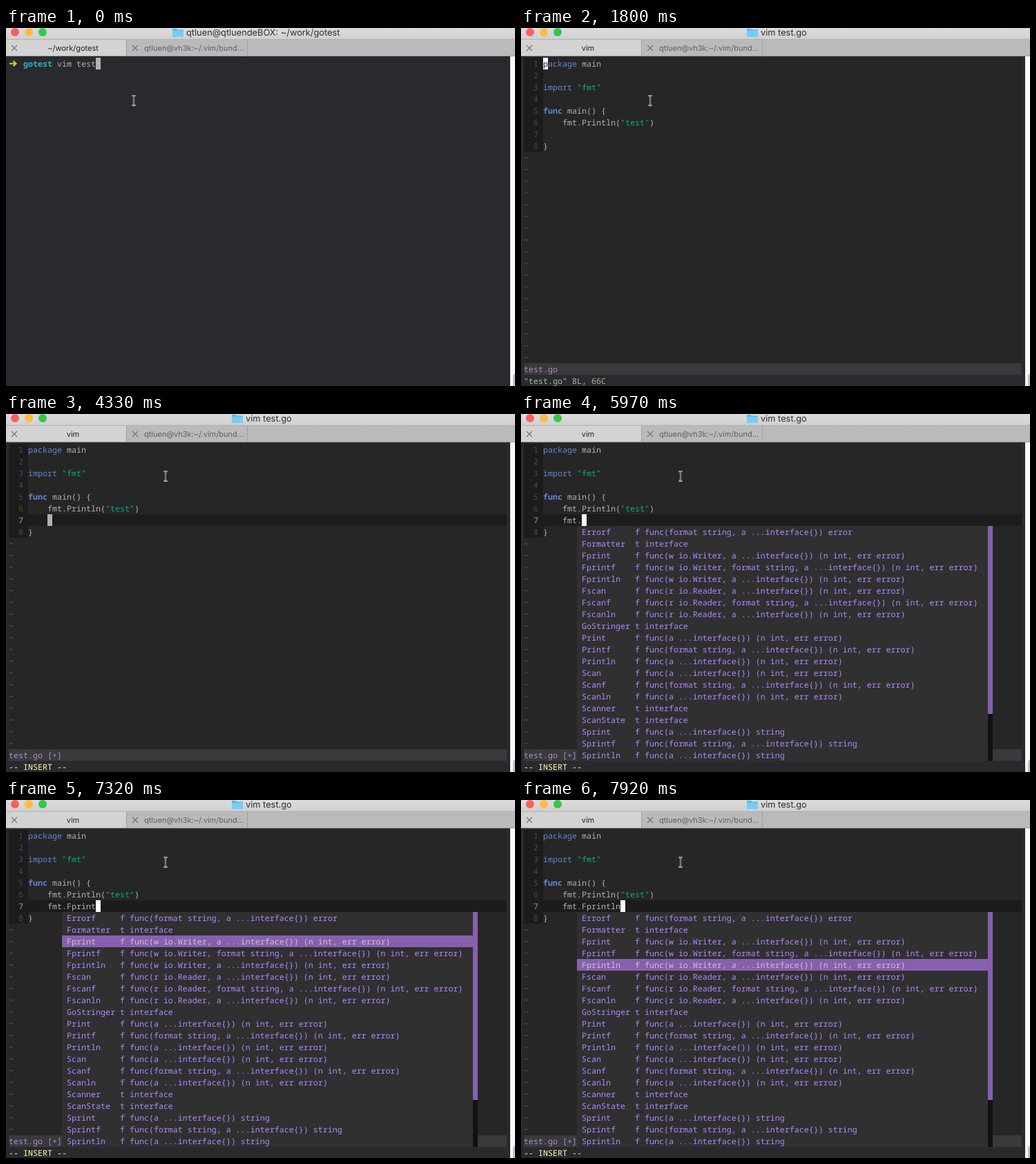
An HTML page that plays this animation: 737 by 518 pixels, repeating every 8000 ms.

```html
<!DOCTYPE html>
<html lang="en">
<head>
<meta charset="utf-8">
<title>Go completion in vim</title>
<style>
  html, body { margin: 0; width: 100%; height: 100%; overflow: hidden; background: #292a2d; }
  svg { display: block; width: 737px; height: 518px; }
  text { white-space: pre; text-rendering: geometricPrecision; }
  .mono { font-family: "Noto Sans Mono", "DejaVu Sans Mono", monospace; font-size: 11.667px; }
  .ui { font-family: Inter, Roboto, sans-serif; font-size: 11px; }
  .title { font-size: 12.8px; }
</style>
</head>
<body>
<svg id="stage" viewBox="0 0 737 518"></svg>
<script>
const LOOP = 8000, CELL = 7, ROW = 17, LEFT = 4, TOP = 43;
const C = {
  term: '#292a2d', editor: '#262626', dark: '#1c1c1c', text: '#b2b2b2', dim: '#4a4a4a',
  tilde: '#606060', keyword: '#5f87d7', string: '#00af87', purple: '#875faf', status: '#3a3a3a',
  label: '#af87d7', menu: '#303030', item: '#af87ff', mode: '#ffffaf'
};

// Each step overrides part of the state from its time onward.
const STEPS = [
  [0, { view: 'shell', command: 'vim test', mouse: [185, 105], cursor: '#b5b5b5', sel: -1 }],
  [600, { command: 'vim test.' }],
  [900, { command: 'vim test.g' }],
  [1050, { command: 'vim test.go' }],
  [1200, { view: 'launch', mouse: [184, 105] }],
  [1350, { view: 'blank', mouse: [185, 105] }],
  [1800, { view: 'vim', mouse: [187, 105], cursor: '#ffffff', row: 0, col: 0, typed: '' }],
  [2400, { row: 1 }],
  [2540, { row: 3 }],
  [2690, { row: 4 }],
  [2840, { row: 5, col: 3 }],
  [2990, { row: 6, col: 0 }],
  [3590, { insert: true }],
  [3890, { joined: true, modified: true, row: 5, col: 23, mouse: [231, 90], cursor: '#b0b0b0' }],
  [4330, { joined: false, row: 6, col: 4 }],
  [5530, { typed: 'fm', menu: 'word' }],
  [5680, { typed: 'fmt' }],
  [5820, { typed: 'fmt.', menu: '' }],
  [5970, { menu: 'members', cursor: '#ffffff' }],
  [7020, { sel: 0 }],
  [7170, { sel: 1 }],
  [7320, { sel: 2 }],
  [7470, { sel: 3 }],
  [7620, { sel: 5 }],
  [7920, { sel: 4 }]
];

const MEMBERS = ('Errorf Formatter Fprint Fprintf Fprintln Fscan Fscanf Fscanln GoStringer Print Printf ' +
  'Println Scan Scanf Scanln Scanner ScanState Sprint Sprintf Sprintln').split(' ');

function describe(name) {
  const head = name.padEnd(11);
  if (/er$|State$/.test(name)) return head + 't interface';
  const stream = /^Fp/.test(name) ? 'w io.Writer, ' : /^Fs/.test(name) ? 'r io.Reader, ' : '';
  const format = name.endsWith('f') ? 'format string, ' : '';
  const result = name === 'Errorf' ? 'error' : /^Sp/.test(name) ? 'string' : '(n int, err error)';
  return `${head}f func(${stream}${format}a ...interface{}) ${result}`;
}

const colX = col => LEFT + CELL * col;
const rowY = row => TOP + ROW * row;
const rect = (x, y, w, h, fill, extra = '') =>
  `<rect x="${x}" y="${y}" width="${w}" height="${h}" fill="${fill}" ${extra}/>`;
const path = (d, stroke, width) =>
  `<path d="${d}" fill="none" stroke="${stroke}" stroke-width="${width}"/>`;
const ui = (x, y, str, fill, extra = '') => `<text class="ui" x="${x}" y="${y}" fill="${fill}" ${extra}>${str}</text>`;

// Spans are [text, colour, bold?] runs set one after another.
function mono(col, row, ...spans) {
  const runs = spans.map(([str, fill, bold]) =>
    `<tspan fill="${fill}"${bold ? ' font-weight="600"' : ''}>${str}</tspan>`).join('');
  return `<text class="mono" x="${colX(col)}" y="${rowY(row) + 13}">${runs}</text>`;
}

function block(col, row, fill, char = '') {
  return rect(colX(col), rowY(row), CELL, ROW, fill) + (char.trim() ? mono(col, row, [char, C.editor]) : '');
}

function closeMark(x) {
  return path(`M${x - 4} 25l8 8m0 -8l-8 8`, '#737373', 1.1);
}

function windowFrame(inShell) {
  const folderX = inShell ? 241 : 327;
  const title = inShell ? 'qtluen@qtluendeBOX: ~/work/gotest' : 'vim test.go';
  const lights = ['#fc605c', '#fdbc40', '#34c84a'].map((fill, i) =>
    `<circle cx="${13 + 20 * i}" cy="6" r="6" fill="${fill}"/>`).join('');
  return `<defs><linearGradient id="bar" x2="0" y2="1"><stop stop-color="#dcdcdc"/><stop offset="1" stop-color="#d0d0d0"/></linearGradient></defs>` +
    rect(0, 0, 737, 17, 'url(#bar)') + rect(0, 16, 737, 1, '#b0b0b0') +
    rect(0, 17, 174, 23, '#d3d3d3') + rect(174, 17, 563, 23, '#bababa') +
    rect(174, 17, 1, 23, '#a0a0a0') + rect(349, 17, 1, 23, '#a0a0a0') + rect(0, 40, 737, 1, '#9c9c9c') +
    lights +
    `<path d="M${folderX} 1h6l1.5 1.5h8.5v10h-16z" fill="#5bb9e8"/>` + rect(folderX, 4, 16, 9, '#74cdf7', 'rx="1"') +
    ui(folderX + 20, 11, title, '#2e2e2e', 'style="font-size:12.8px"') +
    closeMark(12) + closeMark(187) +
    ui(97, 33, inShell ? '~/work/gotest' : 'vim', '#222', 'text-anchor="middle"') +
    ui(200, 33, 'qtluen@vh3k:~/.vim/bund...', '#606060') +
    rect(730, 41, 7, 477, '#fafafa') + rect(734, 500, 8, 22, '#c1c1c1', 'rx="4"');
}

function shell(s) {
  const arrow = path('M5 51.5h9', '#a0e22f', 2.2) + path('M10.5 47.8l4 3.7l-4 3.7', '#a0e22f', 2.2);
  const prompt = arrow + mono(3, 0, ['gotest', '#2ab4c4', true], [' ' + s.command, C.text]);
  return prompt + (s.view === 'launch' ? block(0, 1, s.cursor) : block(10 + s.command.length, 0, s.cursor));
}

function sourceLines(s) {
  const plain = str => [str, C.text];
  const key = (str, bold) => [str, C.keyword, bold];
  const lines = [
    [key('package'), plain(' main')],
    [],
    [key('import'), plain(' '), ['"fmt"', C.string]],
    [],
    [key('func', true), plain(' main() {')],
    [plain('    fmt.Println('), ['"test"', C.string], plain(')')]
  ];
  if (!s.joined) {
    const word = s.sel < 0 ? s.typed : 'fmt.' + MEMBERS[s.sel];
    lines.push(word ? [plain('    ' + word)] : []);
  }
  return [...lines, [plain('}')]];
}

function popup(s) {
  if (s.menu === 'word') {
    return rect(53, rowY(7), 112, ROW, C.menu) + mono(8, 7, ['fmt [ID]', C.item]);
  }
  const y = rowY(7);
  return rect(81, y, 595, 340, C.menu) + rect(676, y, 7, 340, '#121212') + rect(676, y, 7, 272, C.purple) +
    MEMBERS.map((name, i) => {
      const on = i === s.sel;
      return (on ? rect(81, y + ROW * i, 595, ROW, C.purple) : '') +
        mono(12, 7 + i, [describe(name), on ? '#c6c6c6' : C.item]);
    }).join('');
}

function editor(s) {
  const lines = sourceLines(s);
  let out = rect(4, TOP, 721, 459, C.editor) + rect(4, TOP, 28, ROW * lines.length, C.dark);
  if (s.insert) out += rect(32, rowY(s.row), 693, ROW, C.dark);
  lines.forEach((spans, i) => {
    out += mono(2, i, [i + 1, s.insert && i === s.row ? C.label : C.dim]);
    if (spans.length) out += mono(4, i, ...spans);
  });
  for (let row = lines.length; row < 26; row++) out += mono(0, row, ['~', C.tilde]);
  out += rect(4, rowY(26), 721, ROW, C.status) + mono(0, 26, ['test.go' + (s.modified ? ' [+]' : ''), C.label]);
  out += s.insert ? mono(0, 27, ['-- INSERT --', C.mode]) : fileMessage();

  const content = lines[s.row].map(span => span[0]).join('');
  const col = s.typed ? content.length : s.col;
  out += block(4 + col, s.row, s.cursor, content[col]);
  return out + (s.menu ? popup(s) : '');
}

const fileMessage = () => mono(0, 27, ['"test.go" 8L, 66C', C.text]);

function pointer([x, y]) {
  const d = `M${x - 2.5} ${y - 7}q2.5 0 2.5 2v10q0 2 -2.5 2M${x + 2.5} ${y - 7}q-2.5 0 -2.5 2v10q0 2 2.5 2`;
  return path(d, '#f0f0f0', 2.2) + path(d, '#222', 0.7);
}

function scene(s) {
  const body = s.view === 'vim' ? editor(s) : s.view === 'blank' ? fileMessage() : shell(s);
  return rect(0, 0, 737, 518, C.term) + body + windowFrame(s.view === 'shell') + pointer(s.mouse);
}

const stage = document.getElementById('stage');
let shown = 0;

function render(time) {
  const count = STEPS.filter(([start]) => start <= time).length;
  if (count === shown) return;
  shown = count;
  stage.innerHTML = scene(Object.assign({}, ...STEPS.slice(0, count).map(step => step[1])));
}

function tick() {
  render(performance.now() % LOOP);
  requestAnimationFrame(tick);
}
tick();
</script>
</body>
</html>
```
